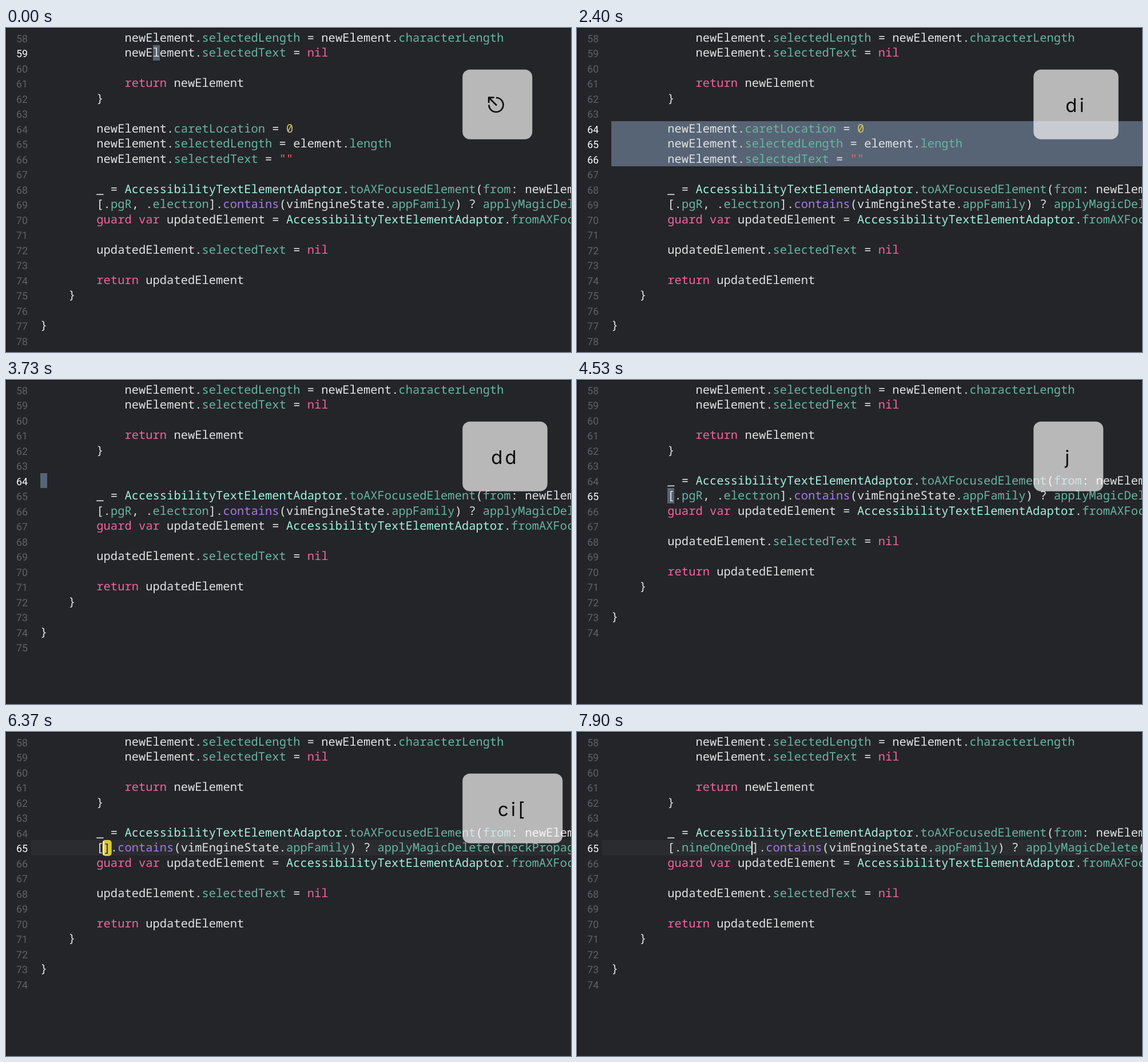
An HTML page that plays this animation: 988 px wide and 567 px high, repeating every 8 s.

```html
<!DOCTYPE html>
<html lang="en">
<head>
<meta charset="utf-8">
<title>Modal editing</title>
<style>
  html, body { margin: 0; width: 100%; height: 100%; overflow: hidden; background: #242529; }
  svg { display: block; width: 988px; height: 567px; }
  text { white-space: pre; text-rendering: geometricPrecision; }
  .code { font: 20.484px "Noto Sans Mono", monospace; fill: #e2e2e3; }
  .num { font: 17.8px Roboto, sans-serif; fill: #606166; text-anchor: end; }
  .num.now { fill: #fff; }
  .word { fill: #f4639f; }
  .type { fill: #a2f3de; }
  .member { fill: #68b6a2; }
  .call { fill: #a57be6; }
  .digit { fill: #d9c668; }
  .string { fill: #f7695f; }
  .dim { fill: #8f888c; }
  .hint { fill: #4fb0cb; }
  .keytext { font: 33px Inter, sans-serif; letter-spacing: 4.2px; text-anchor: middle; fill: #0c0c0d; }
  .badge { font: 700 17px Inter, sans-serif; text-anchor: middle; fill: #fff; }
</style>
</head>
<body>
<svg viewBox="0 0 988 567">
  <rect width="988" height="567" fill="#242529"/>
  <g id="editor"></g>
  <g id="match">
    <rect x="168.7" y="189" width="16" height="28" rx="5" fill="#d8ca40"/>
    <text class="code" x="170.5" y="209.5" style="fill:#29270f">]</text>
  </g>
  <rect id="caret" width="2" height="24" fill="#f4f4f4"/>
  <g id="popup"></g>
  <g id="key"></g>
  <path d="M0 .5H988M.5 0V567" stroke="#111214" fill="none"/>
</svg>
<script>
const LOOP = 8000, LEFT = 60, CELL = 12.29, ROW = 26.5, FIRST = 58;
const el = id => document.getElementById(id);
const rowTop = line => 3.5 + (line - FIRST) * ROW;
const colX = col => LEFT + col * CELL;

const rules = [
  ["word", /^(return|guard|var|nil)\b/],
  ["type", /^(AccessibilityTextElementAdaptor|AppFamily)\b/],
  ["call", /^contains\b/],
  ["digit", /^\d+/],
  ["string", /^"[^"]*"/],
  ["member", /^(from|applyMagicDelete|checkPropagation)\b/]
];

const span = (cls, s) => `<tspan class="${cls}">${s}</tspan>`;

function paint(src) {
  let out = "", prev = "";
  while (src) {
    const rule = rules.find(r => r[1].test(src));
    const tok = rule ? src.match(rule[1])[0] : src.match(/^(\w+|[^\w])/)[0];
    const cls = rule ? rule[0] : prev === "." && /\w/.test(tok) ? "member" : "";
    out += cls ? span(cls, tok) : tok;
    prev = tok;
    src = src.slice(tok.length);
  }
  return out;
}

// Each line is [indent, code].
const blank = [0, ""];
const head = [
  [12, "newElement.selectedLength = newElement.characterLength"],
  [12, "newElement.selectedText = nil"],
  blank,
  [12, "return newElement"],
  [8, "}"],
  blank
];
const paragraph = [
  [8, "newElement.caretLocation = 0"],
  [8, "newElement.selectedLength = element.length"],
  [8, 'newElement.selectedText = ""']
];
const tail = list => [
  [8, "_ = AccessibilityTextElementAdaptor.toAXFocusedElement(from: newElement)"],
  [8, `[${list}].contains(vimEngineState.appFamily) ? applyMagicDelete(checkPropagation) : ()`],
  [8, "guard var updatedElement = AccessibilityTextElementAdaptor.fromAXFocusedElement()"],
  blank,
  [8, "updatedElement.selectedText = nil"],
  blank,
  [8, "return updatedElement"],
  [4, "}"],
  blank,
  [0, "}"],
  blank
];

// Changes accumulate from one step to the next.
const scenes = [];
[
  [0, { key: "esc", cut: 0, list: ".pgR, .electron", block: [59, 16] }],
  [730, { key: "6" }],
  [830, { key: "64" }],
  [1230, { key: "64G", block: [64, 8] }],
  [2200, { key: "d" }],
  [2300, { key: "di" }],
  [2400, { block: null, select: [64, 66] }],
  [2430, { key: "dip", cut: 1, select: null, block: [64, 0] }],
  [3570, { key: "d" }],
  [3700, { key: "dd" }],
  [3770, { block: null, select: [64, 64] }],
  [3830, { cut: 2, select: null, block: [64, 8] }],
  [4530, { key: "j", block: [65, 8] }],
  [5170, { key: "f" }],
  [5400, { key: "fe", block: [65, 16] }],
  [5830, { key: "c" }],
  [5870, { key: "ci" }],
  [5900, { key: "ci[", list: "", block: null, caret: [65, 9] }],
  [6930, { list: ".", caret: [65, 10] }],
  [7000, { popup: true }],
  [7500, { blink: true }],
  [7900, { list: ".nineOneOne", caret: [65, 20], popup: false, blink: false }]
].reduce((state, [at, change]) => {
  const next = { ...state, ...change, at };
  scenes.push(next);
  return next;
}, {});

const keyFade = [[0, 1], [7170, .68], [7200, .5], [7230, .33], [7270, .16], [7300, 0]];
const matchScale = [[0, 1], [5930, 1.4], [5970, 1.8], [6000, 2], [6030, 1.5], [6070, 1]];
const matchFade = [[0, 0], [5930, 1], [6400, .8], [6430, .6], [6470, .4], [6500, .2], [6530, 0]];
const stepAt = (steps, t) => steps.findLast(s => s[0] <= t)[1];

const box = (x, y, w, h, fill, extra = "") =>
  `<rect x="${x}" y="${y}" width="${w}" height="${h}" fill="${fill}" ${extra}/>`;

function drawEditor(s) {
  const lines = [...head, ...(s.cut < 1 ? paragraph : []), ...(s.cut < 2 ? [blank] : []), ...tail(s.list)];
  const [from, to] = s.select || [(s.block || s.caret)[0], (s.block || s.caret)[0]];
  const top = Math.round(rowTop(from)), height = Math.round(rowTop(to + 1)) - top;
  let out = "";
  if (s.caret) out += box(44, top, 944, height, "#2a2c30");
  if (s.select) out += box(LEFT, top, 928, height, "#576475");
  if (s.block) out += box(Math.round(colX(s.block[1])), top, 12, height, "#576475");
  lines.forEach(([indent, src], i) => {
    const n = FIRST + i, y = rowTop(n);
    out += `<text class="num${n >= from && n <= to ? " now" : ""}" x="38" y="${y + 21.4}">${n}</text>`;
    if (src) out += `<text class="code" x="${colX(indent)}" y="${y + 20.3}">${paint(src)}</text>`;
  });
  return out;
}

function drawKey(label) {
  const single = label === "esc";
  const w = 122 + (single ? 0 : label.length - 1) * 26.5;
  const face = box(798.3, 72.7, w, 122, "#fff", 'rx="13" fill-opacity=".675"');
  const mark = single
    ? '<path d="M857 122A12.5 12.5 0 1 1 844.5 134.5M858 135.5L845 122.5M844.2 131V121.7H853.5" fill="none" stroke="#0c0c0d" stroke-width="2.7"/>'
    : `<text class="keytext" x="${798.3 + w / 2}" y="146.5">${label}</text>`;
  return face + mark;
}

function drawPopup() {
  const names = ["nineOneOne", "auto", "electron", "keyMapping", "off", "pgR",
    `hash${span("dim", "(_ ")}self${span("dim", ":)")}`];
  let out = box(136, 216.5, 497, 251.5, "#2d242a",
    'rx="6" style="filter:drop-shadow(0 4px 9px rgba(0,0,0,.3))"');
  out += '<path d="M136 246.5V222.5a6 6 0 0 1 6-6H627a6 6 0 0 1 6 6V246.5Z" fill="#0250c8"/>';
  names.forEach((name, i) => {
    const y = 231.5 + i * 30.45, method = i === 6;
    out += box(148, y - 10.5, 21, 21, method ? "#12306f" : "#0b3b18",
      `rx="4" stroke="${method ? "#4180e8" : "#30a454"}" stroke-width="1.6"`);
    out += `<text class="badge" x="158.5" y="${y + 6.2}">${method ? "M" : "K"}</text>`;
    out += `<text class="code" x="182" y="${y + 7}">${name}</text>`;
  });
  out += '<path d="M136 429H633" stroke="#50494d"/>';
  out += `<text class="code" x="182" y="456">${span("hint", "nineOneOne")}: ${span("type", "AppFamily")}</text>`;
  return out + box(136, 216.5, 497, 251.5, "none", 'rx="6" stroke="#5d575b"');
}

el("popup").innerHTML = drawPopup();
let shown = null;

function show(s) {
  el("editor").innerHTML = drawEditor(s);
  el("key").innerHTML = drawKey(s.key);
  el("popup").style.display = s.popup ? "" : "none";
  const caret = el("caret");
  caret.style.display = s.caret && !s.blink ? "" : "none";
  if (s.caret) {
    caret.setAttribute("x", colX(s.caret[1]) - .9);
    caret.setAttribute("y", rowTop(s.caret[0]) + 2);
  }
}

function tick() {
  const t = performance.now() % LOOP;
  const scene = scenes.findLast(s => s.at <= t);
  if (scene !== shown) show(shown = scene);
  el("key").setAttribute("opacity", stepAt(keyFade, t));
  const match = el("match"), k = stepAt(matchScale, t);
  match.setAttribute("opacity", stepAt(matchFade, t));
  match.setAttribute("transform", `translate(176.7 203) scale(${k}) translate(-176.7 -203)`);
  requestAnimationFrame(tick);
}
tick();
</script>
</body>
</html>
```
